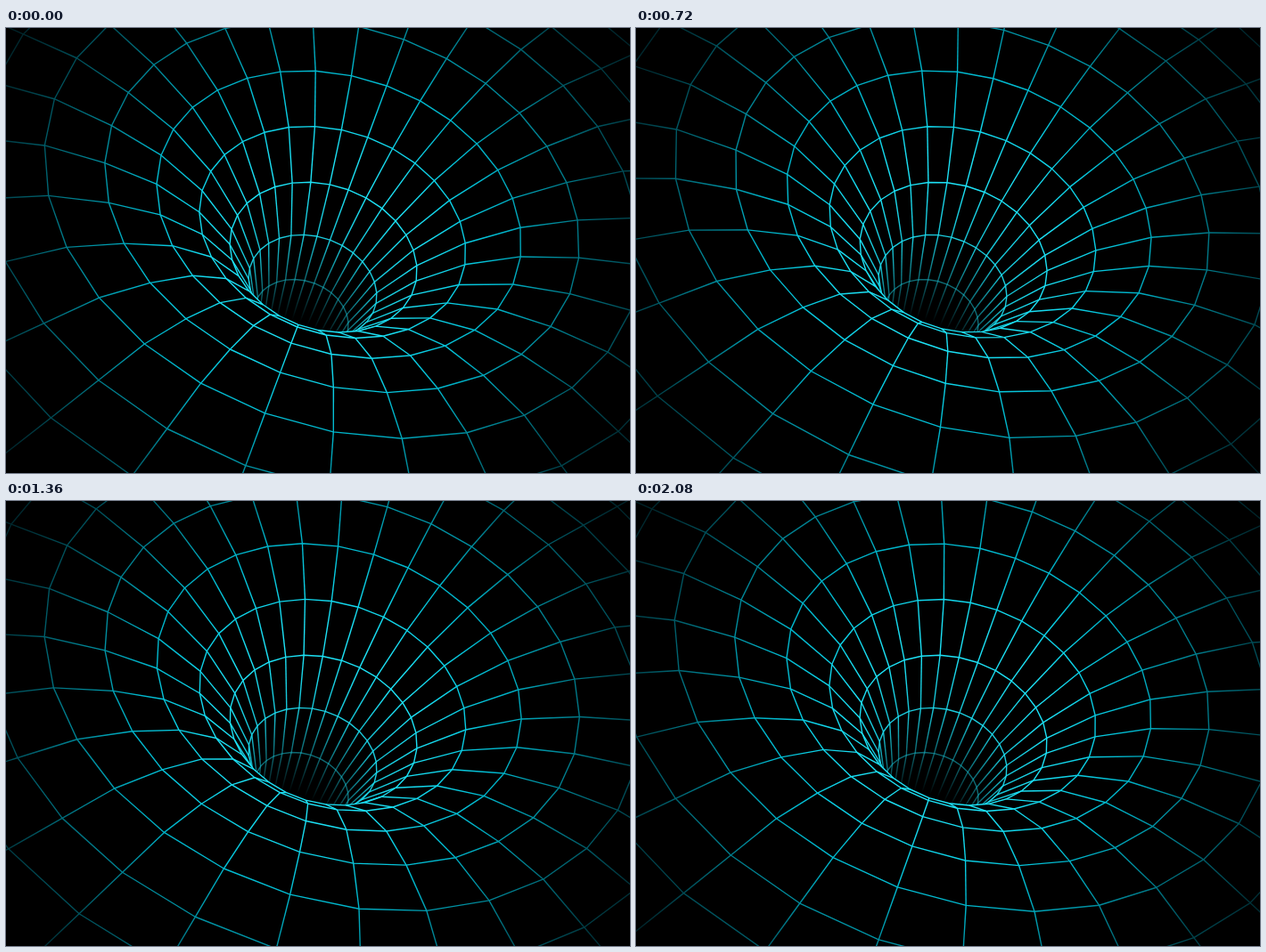
Animation of 700x500 px, one loop 2.16 s. Source, as an HTML page with a canvas:

```html
<!DOCTYPE html>
<html lang="en">
<head>
<meta charset="utf-8">
<title>Wireframe funnel</title>
<style>
  html, body { margin: 0; width: 100%; height: 100%; overflow: hidden; background: #000; }
  canvas { display: block; width: 700px; height: 500px; }
</style>
</head>
<body>
<canvas id="stage" width="700" height="500"></canvas>
<script>
const ctx = document.getElementById('stage').getContext('2d');
const LOOP = 2160, STEP = 80, SPOKES = 30, PHASE = 0.02;
const SLICE = 2 * Math.PI / SPOKES;

// Camera: roll, sine of the viewing elevation, perspective distance, sideways shift
const ROLL = 20 * Math.PI / 180, TILT = 0.748, DIST = 3300, SHIFT = 8.3;
const COS = Math.cos(ROLL), SIN = Math.sin(ROLL);

// Rings from the bottom of the funnel outwards: radius, height offset
const RINGS = [
  [44, 116], [54.2, 77.1], [73.8, 39.1], [107.8, 2.4], [153.5, -30.2],
  [210, -55.9], [273, -72.7], [342.5, -84], [410, -83.5], [477, -83], [545, -83]
];
const DEPTH_ALPHA = [0, 0.47, 0.9];
const alphaOf = i => DEPTH_ALPHA[i] ?? 1;

const glow = ctx.createRadialGradient(352, 250, 0, 352, 250, 450);
[[0, '30,225,245'], [110, '28,225,245'], [160, '10,205,227'], [205, '0,182,204'],
 [255, '0,146,164'], [320, '0,97,110'], [380, '0,56,64'], [450, '0,18,22']]
  .forEach(([r, rgb]) => glow.addColorStop(r / 450, `rgb(${rgb})`));

function project([radius, drop], angle) {
  const s = Math.sin(angle);
  const w = 1 - radius / DIST * s;
  const u = radius * Math.cos(angle) / w + SHIFT;
  const v = (drop + radius * TILT * s) / w;
  return [350 + u * COS - v * SIN, 250 + u * SIN + v * COS];
}

function addLoop(points) {
  points.forEach(([x, y], i) => i ? ctx.lineTo(x, y) : ctx.moveTo(x, y));
  ctx.closePath();
}

function fadeLine(p, q, from, to) {
  const fade = ctx.createLinearGradient(...p, ...q);
  fade.addColorStop(0, `rgba(24,215,235,${from})`);
  fade.addColorStop(1, `rgba(28,225,245,${to})`);
  return fade;
}

function draw(turn) {
  ctx.globalAlpha = 1;
  ctx.fillStyle = '#000';
  ctx.fillRect(0, 0, 700, 500);
  ctx.lineWidth = 1.4;
  ctx.lineJoin = 'round';

  const loops = RINGS.map(ring => Array.from({ length: SPOKES },
    (_, k) => project(ring, -Math.PI / 2 + (k + turn + PHASE) * SLICE)));

  // Each band covers the deeper ones, which hides the front wall
  for (let i = 0; i < loops.length - 1; i++) {
    const inner = loops[i], outer = loops[i + 1];
    const from = alphaOf(i), to = alphaOf(i + 1);

    ctx.globalAlpha = 1;
    ctx.beginPath();
    addLoop(inner);
    addLoop(outer);
    ctx.fill('evenodd');

    inner.forEach((p, k) => {
      const q = outer[k];
      ctx.strokeStyle = from < 1 ? fadeLine(p, q, from, to) : glow;
      ctx.beginPath();
      ctx.moveTo(...p);
      ctx.lineTo(...q);
      ctx.stroke();
    });

    ctx.globalAlpha = from;
    ctx.strokeStyle = glow;
    ctx.beginPath();
    addLoop(inner);
    ctx.stroke();
  }
}

let start = null, shown = -1;
function tick(now) {
  start ??= now;
  const step = Math.floor((now - start) % LOOP / STEP);
  if (step !== shown) {
    shown = step;
    draw(step * STEP / LOOP);
  }
  requestAnimationFrame(tick);
}
draw(0);
requestAnimationFrame(tick);
</script>
</body>
</html>
```
